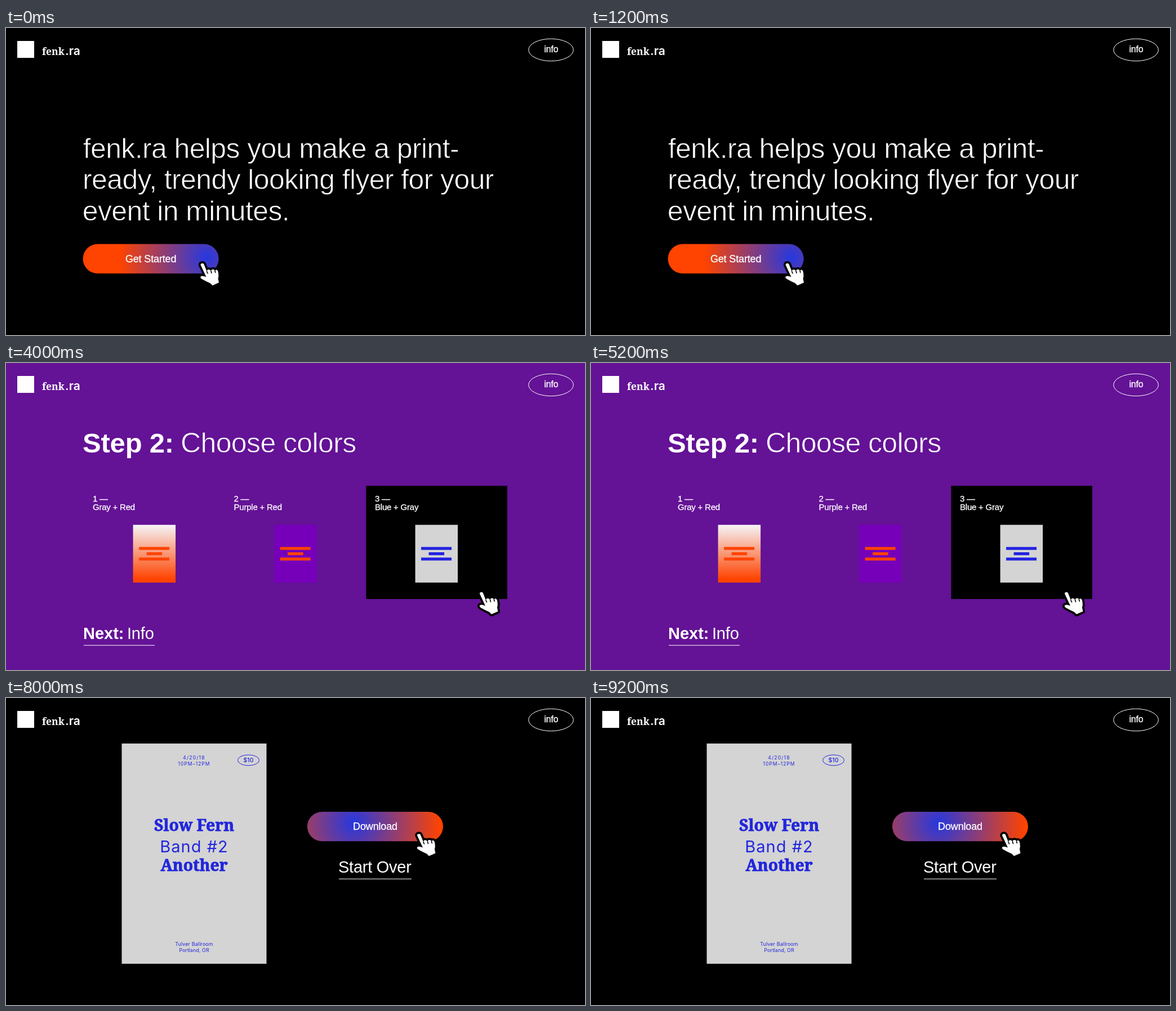
These frames come from a looping animation (1028 px wide and 545 px high, 10000 ms). An HTML page with a canvas:

```html
<!DOCTYPE html>
<html lang="en">
<head>
<meta charset="utf-8">
<title>Flyer maker walkthrough</title>
<style>
  html, body { margin: 0; width: 100%; height: 100%; overflow: hidden; background: #000; }
  canvas { display: block; width: 1028px; height: 545px; }
</style>
</head>
<body>
<canvas id="stage"></canvas>
<script>
const W = 1028, H = 545, SCENE_MS = 2000;
const WHITE = '#fff', BLACK = '#000', BLUE = '#2638df', PURPLE = '#641296',
      ORANGE = '#ff4300', GRAY = '#d4d4d4', INK = '#2226dc';
const SANS = '"Liberation Sans", Arial, sans-serif';
const GROTESK = 'Inter, sans-serif';
const SERIF = '"Noto Serif", serif';

const canvas = document.getElementById('stage');
const ctx = canvas.getContext('2d');
const ratio = window.devicePixelRatio || 1;
canvas.width = W * ratio;
canvas.height = H * ratio;

const handShape = new Path2D(
  'M-3 1.5 C-3.5 -1.5 2 -2.5 3 .5 L8 13 Q9 9 12.5 10 Q15 10.5 15.5 13 ' +
  'Q16 9 19 9.5 Q22 9.5 22.5 12.5 Q23.5 9.5 26 10.5 Q28 11.5 28.5 16 ' +
  'Q29.5 22 28 26 L29.5 33 L18 38 L14 34 Q7 31 0 27 Q-4 25 -3 22.5 Q-1 20.5 4 22 L7 23 Z');
const handCreases = new Path2D('M8 13 L9.5 16.5 M15.5 12.5 L16.5 16 M22.5 12 L23.3 15');

function rect(x, y, w, h, color) {
  ctx.fillStyle = color;
  ctx.fillRect(x, y, w, h);
}

// An edge stroke thickens the glyphs, or thins them when given the background colour.
function text(str, x, y, size, o = {}) {
  const { font = SANS, weight = 400, color = WHITE, gap = 0, align = 'left',
          edge = 0, edgeColor = color } = o;
  ctx.font = `${weight} ${size}px ${font}`;
  ctx.letterSpacing = gap + 'px';
  ctx.textAlign = align;
  ctx.fillStyle = color;
  ctx.fillText(str, x, y);
  if (!edge) return;
  ctx.strokeStyle = edgeColor;
  ctx.lineWidth = edge;
  ctx.lineJoin = 'round';
  ctx.strokeText(str, x, y);
}

const small = (str, x, y, color = WHITE) => text(str, x, y, 15, { gap: -0.22, color, edge: 0.3 });
const label = (str, x, y, size) => text(str, x, y, size, { align: 'center', gap: -0.15, edge: 0.3 });
const light = (str, x, y, bg) => text(str, x, y, 50, { gap: -0.62, edge: 0.8, edgeColor: bg });

function ellipse(x, y, rx, ry, color) {
  ctx.beginPath();
  ctx.ellipse(x, y, rx, ry, 0, 0, Math.PI * 2);
  ctx.strokeStyle = color;
  ctx.lineWidth = 1;
  ctx.stroke();
}

function header() {
  rect(20, 23, 30, 30, WHITE);
  text('fenk', 64, 48, 17.5, { font: SERIF, weight: 700 });
  text('.ra', 105, 48, 21, { font: GROTESK, weight: 600 });
  ellipse(967.6, 38.9, 39.8, 19.7, WHITE);
  label('info', 968, 43, 16);
}

function hand(x, y) {
  ctx.save();
  ctx.translate(x, y);
  ctx.lineJoin = ctx.lineCap = 'round';
  ctx.strokeStyle = BLACK;
  ctx.lineWidth = 7.5;
  ctx.stroke(handShape);
  ctx.fillStyle = WHITE;
  ctx.fill(handShape);
  ctx.lineWidth = 1.6;
  ctx.stroke(handCreases);
  ctx.restore();
}

function button(x, y, caption, glowX, glowY) {
  const glow = ctx.createRadialGradient(glowX, glowY, 0, glowX, glowY, 155);
  glow.addColorStop(0, BLUE);
  glow.addColorStop(1, ORANGE);
  ctx.fillStyle = glow;
  ctx.beginPath();
  ctx.roundRect(x, y, 241, 52.3, 26.1);
  ctx.fill();
  label(caption, x + 120.5, y + 32.2, 18);
}

function step(n, title, bg) {
  text(`Step ${n}:`, 136, 159, 49, { weight: 700, gap: -0.2 });
  light(title, 310, 159, bg);
}

function next(name, x, width) {
  text('Next:', x - 1, 490, 29, { weight: 700 });
  text(name, x + 77, 490, 29, { gap: -0.2 });
  rect(x, 500.7, width, 1, WHITE);
}

const cardX = i => 138.4 + i * 250.5;

function cards(labels, active) {
  rect(cardX(active), 218, 250.5, 201, BLACK);
  labels.forEach((name, i) => {
    small(`${i + 1} —`, cardX(i) + 15.6, 246);
    small(name, cardX(i) + 15.6, 261);
  });
}

function swatch(i, fill, bars) {
  const x = cardX(i) + 87.2;
  rect(x, 287.3, 75.5, 102.5, fill);
  rect(x + 10.5, 326.6, 54, 5.2, bars);
  rect(x + 24, 336, 27.5, 5.2, bars);
  rect(x + 10.5, 345.4, 54, 5.2, bars);
}

function sceneIntro() {
  light('fenk.ra helps you make a print-', 136.7, 231, BLACK);
  light('ready, trendy looking flyer for your', 136, 286.4, BLACK);
  light('event in minutes.', 135.7, 341.7, BLACK);
  button(136.6, 383.5, 'Get Started', 356, 407);
  hand(348.5, 419);
}

function sceneFonts() {
  step(1, 'Choose fonts', BLUE);
  cards(['Eczar + Work Sans', 'Archivo Black + Tenor', 'Rubik + Roboto Mono'], 1);
  text('A', 216, 367.5, 80, { font: SERIF, weight: 900, edge: 2 });
  text('a', 267, 353, 82, { font: GROTESK, weight: 300 });
  text('A', 461, 367, 80, { font: GROTESK, weight: 200 });
  text('a', 510, 355, 84, { font: GROTESK, weight: 900 });
  text('A', 715, 367, 79, { font: GROTESK, weight: 900, edge: 2 });
  text('a', 771, 354, 85, { font: 'Roboto, sans-serif' });
  next('Color', 138, 146);
  hand(586, 396.5);
}

function sceneColors() {
  step(2, 'Choose colors', PURPLE);
  cards(['Gray + Red', 'Purple + Red', 'Blue + Gray'], 2);
  const fade = ctx.createLinearGradient(0, 287, 0, 384);
  fade.addColorStop(0, '#f5f5f8');
  fade.addColorStop(1, ORANGE);
  swatch(0, fade, ORANGE);
  swatch(1, '#7600b9', ORANGE);
  swatch(2, GRAY, '#2222e2');
  next('Info', 138, 126);
  hand(844, 408);
}

function sceneInfo() {
  step(3, 'Info', ORANGE);
  const columns = [
    ['1 —', ['Event name', '(or band names)'], ['Slow Fern', 'Band #2', 'Another']],
    ['2 —', ['Event time + price + date'], ['10pm–12pm', '$10', '4/20/18']],
    ['5 —', ['Event location'], ['Tulver Ballroom', 'Portland, OR', 'Address line 2']]
  ];
  columns.forEach(([number, lines, fields], c) => {
    const x = 136.5 + c * 257;
    small(number, x, 223);
    lines.forEach((line, i) => small(line, x, 240 + i * 17));
    fields.forEach((value, r) => {
      const y = 267.8 + r * 42.5;
      const last = c === 2, active = last && r === 1;
      if (active) rect(x, y, 234.5, 34.8, WHITE);
      ctx.strokeStyle = WHITE;
      ctx.lineWidth = 1;
      ctx.strokeRect(x + 0.4, y + 0.4, 233.8, 34);
      small(value, x + 8.7, y + 22.8, active ? BLACK : last && r === 2 ? '#ffa788' : WHITE);
    });
  });
  next('Preview', 137, 178);
  hand(800, 331);
}

function sceneResult() {
  const line = (str, y, size, o = {}) =>
    text(str, 334, y, size, { font: GROTESK, color: INK, align: 'center', ...o });
  const heavy = { font: SERIF, weight: 900, edge: 0.9 };
  rect(205.5, 80.8, 257, 391, GRAY);
  line('4/20/18', 109, 8.5, { gap: 1.2 });
  line('10PM–12PM', 119.5, 8.5, { gap: 1 });
  ellipse(430.5, 110.4, 19, 9.5, INK);
  text('$10', 430.5, 114, 10.5, { font: GROTESK, weight: 500, color: INK, align: 'center' });
  line('Slow Fern', 235.5, 28.4, heavy);
  line('Band #2', 273.5, 29, { gap: 1 });
  line('Another', 307, 28.4, heavy);
  line('Tulver Ballroom', 440, 8.8, { gap: 0.2 });
  line('Portland, OR', 450.5, 8.8, { gap: 0.1 });
  button(535, 202, 'Download', 617, 222);
  text('Start Over', 590, 310, 29, { gap: -0.25 });
  rect(591, 320.7, 129, 1, WHITE);
  hand(733, 242.5);
}

const scenes = [
  [BLACK, sceneIntro], [BLUE, sceneFonts], [PURPLE, sceneColors],
  [ORANGE, sceneInfo], [BLACK, sceneResult]
];

function frame() {
  const [bg, draw] = scenes[Math.floor(performance.now() / SCENE_MS) % scenes.length];
  ctx.setTransform(ratio, 0, 0, ratio, 0, 0);
  rect(0, 0, W, H, bg);
  header();
  draw();
  requestAnimationFrame(frame);
}
frame();
</script>
</body>
</html>
```
